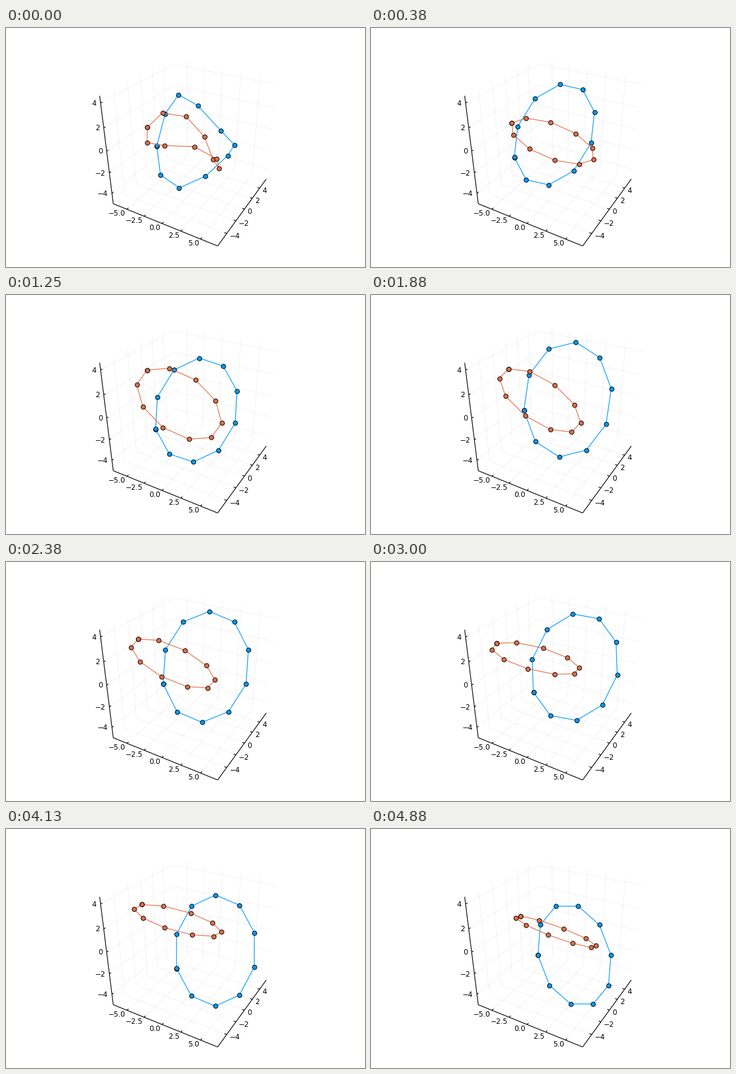
A matplotlib script that plays this animation: 600 px wide and 400 px high, repeating every 5010 ms.

```python
import numpy as np
import matplotlib.pyplot as plt
from matplotlib.animation import FuncAnimation
from matplotlib.collections import LineCollection

W, H, DPI = 600, 400, 100
PX = 72 / DPI
LOOP, TICK = 5010, 10
STEPS, BEADS = 40, 10

LIMITS = [(-7.08, 7.05), (-5.82, 5.94), (-5.07, 4.55)]
X_TICKS = np.linspace(-5, 5, 5)
TICKS = range(-4, 5, 2)


def project(p):
    """Perspective view of the unit cube, camera at azimuth 30, elevation 30."""
    x, y, z = p
    right = 0.866 * x + 0.5 * y
    up = -0.25 * x + 0.433 * y + 0.866 * z
    depth = 6.692 - (0.433 * x - 0.75 * y + 0.5 * z)
    return 312.8 + 672 * right / depth, 191.6 - 672 * up / depth


def unit(axis, v):
    lo, hi = LIMITS[axis]
    return 2 * (v - lo) / (hi - lo) - 1


def path(*pts):
    return [project(p) for p in pts]


class Ring:
    """Beads spaced evenly on a drifting, tilting ellipse that starts out crumpled.

    Each pose is centre x, y, then the cosine arm x, y and the sine arm x, y.
    The crumple holds the same two arms for the second and third harmonics.
    """
    AT = (0, 3, 10, 15, 24, 33, 39)

    def __init__(self, color, first, poses, crumple):
        self.tracks = np.transpose(poses)
        self.crumple = np.array(crumple)
        self.angle = 2 * np.pi * (np.arange(BEADS + 1) + first)[:, None] / BEADS
        self.line, = ax.plot([], [], "-o", color=color, lw=1.2 * PX,
                             ms=7.4 * PX, mec="black", mew=PX)

    def wave(self, n, arms):
        return np.cos(n * self.angle) * arms[:2] + np.sin(n * self.angle) * arms[2:]

    def show(self, step):
        pose = np.array([np.interp(step, self.AT, t) for t in self.tracks])
        pts = pose[:2] + self.wave(1, pose[2:])
        fade = max(0, 1 - step / self.AT[1]) ** 2
        for n, arms in enumerate(self.crumple, 2):
            pts = pts + fade * self.wave(n, arms)
        self.line.set_data(*pts.T)


fig = plt.figure(figsize=(W / DPI, H / DPI), dpi=DPI, facecolor="white")
ax = fig.add_axes([0, 0, 1, 1])
ax.set(xlim=(0, W), ylim=(H, 0))
ax.axis("off")

grid, axes = [], [path((-1, -1, -1), (1, -1, -1)), path((1, -1, -1), (1, 1, -1)),
                  path((-1, -1, -1), (-1, -1, 1))]


def add_tick(wall, inner, text, dx, dy, ha):
    """Grid line along the walls, tick at its start, label beside it."""
    grid.append(path(*wall))
    axes.append(path(wall[0], inner))
    x, y = project(wall[0])
    ax.text(x + dx, y + dy + 4.2, text.replace("-", "\u2212"), ha=ha, va="baseline",
            fontsize=12 * PX, family="DejaVu Sans", color="black")


T = 0.04 - 1
for v in X_TICKS:
    x = unit(0, v)
    add_tick([(x, -1, -1), (x, 1, -1), (x, 1, 1)], (x, T, -1), f"{v:.1f}", -2.5, 6.8, "right")
for v in TICKS:
    y, z = unit(1, v), unit(2, v)
    add_tick([(1, y, -1), (-1, y, -1), (-1, y, 1)], (-T, y, -1), f"{v}", 4.5, 4, "left")
    add_tick([(-1, -1, z), (-1, 1, z), (1, 1, z)], (-1, T, z), f"{v}", -6.7, 0, "right")

ax.add_collection(LineCollection(grid, colors=[(0, 0, 0, 0.07)], linewidths=0.75 * PX))
ax.add_collection(LineCollection(axes, colors="black", linewidths=1.2 * PX))

rings = [
    Ring("#009afa", 0, [
        (312, 192.5, -64, 1, 3, 69),
        (306.5, 178.5, -67, 38, 12, 76),
        (318, 192.5, -68, 32, 17, 81),
        (328.5, 175, -73, 18, 9, 95),
        (340.5, 176, -69, 42, 26, 80),
        (350, 203.5, -65, 30, 21, 88),
        (340, 211, -61, 0, 13, 86)],
        [(5, 4, -5, 16), (-1, 0, -1, -5)]),
    Ring("#e26f46", 1, [
        (300, 190, -57, -16, -26, -34),
        (303.5, 189.5, -66, -11, -25, -37),
        (289.5, 182, -71, -32, 6, -52),
        (282.5, 176.5, -68, -37, 4, -39),
        (275, 161.5, -73, -15, -10, -23),
        (287, 153, -73, -19, -1, -19),
        (309, 172, -67, -23, -8, -13)],
        [(-9, 16, -1, 6), (2, 2, 2, -1)]),
]


def update(i):
    t = i * TICK
    # Steps last 130 ms and 120 ms in turn
    step = min(t // 250 * 2 + (t % 250 >= 130), STEPS - 1)
    for ring in rings:
        ring.show(step)
    return [ring.line for ring in rings]


anim = FuncAnimation(fig, update, frames=LOOP // TICK, interval=TICK,
                     repeat=True, repeat_delay=0)
plt.show()
```
